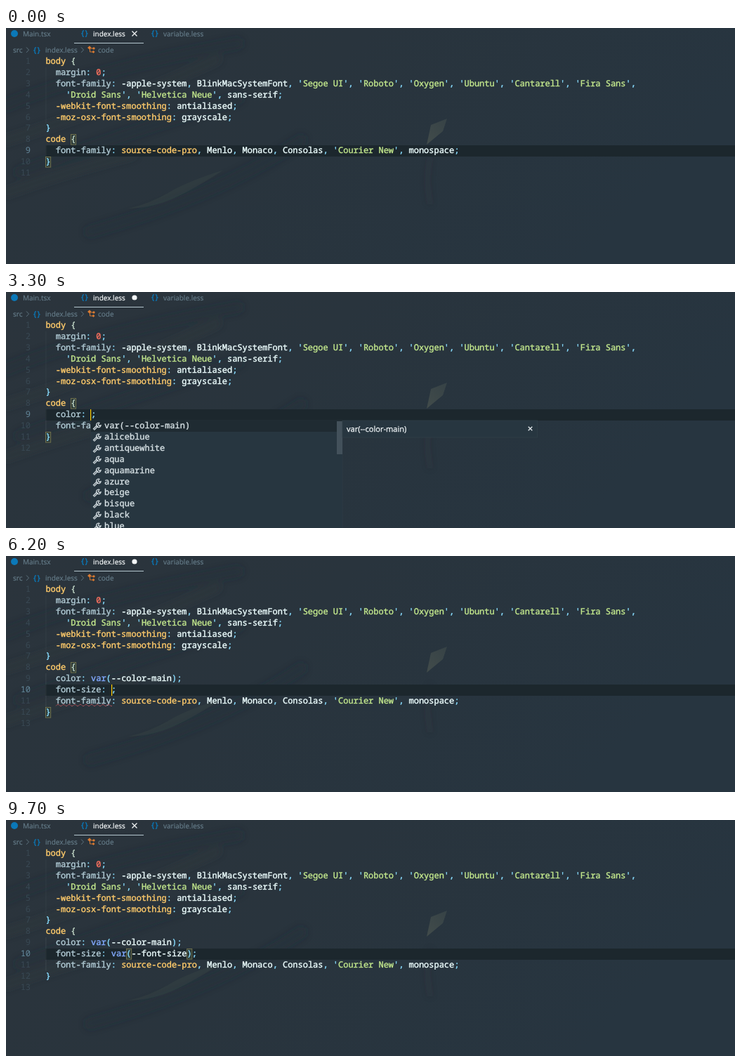
Write an HTML page that moves like this. It is 1038x336 px and loops after 9.9 s.

```html
<!DOCTYPE html>
<html lang="en">
<head>
<meta charset="utf-8">
<title>Editor completion</title>
<style>
  html, body { margin: 0; width: 100%; height: 100%; overflow: hidden; background: #28343e; }
  svg { display: block; width: 1038px; height: 336px; }
  text { white-space: pre; text-rendering: geometricPrecision; }
  .mono { font: 500 11.975px "Noto Sans Mono", "DejaVu Sans Mono", monospace; stroke-width: .4; }
  .ui { font: 10px "Open Sans", "Noto Sans", sans-serif; stroke-width: .2; }
  .doc { font: 11.05px "Open Sans", "Noto Sans", sans-serif; stroke-width: .3; }
  .hit { fill: #80cbc4; stroke: none; font-weight: 700; }
</style>
</head>
<body>
<svg viewBox="0 0 1038 336">
  <defs>
    <linearGradient id="sky" x2="1" y2="0.3">
      <stop offset="0" stop-color="#2b343c"/>
      <stop offset="0.45" stop-color="#29343d"/>
      <stop offset="1" stop-color="#273540"/>
    </linearGradient>
    <linearGradient id="kite" x1="1" y1="0" x2="0" y2="1">
      <stop offset="0" stop-color="#364246"/>
      <stop offset="1" stop-color="#424c4b"/>
    </linearGradient>
    <filter id="soft" x="-20%" y="-50%" width="140%" height="200%"><feGaussianBlur stdDeviation="5"/></filter>
  </defs>
  <rect width="1038" height="336" fill="url(#sky)"/>
  <g filter="url(#soft)" fill="none" stroke-linecap="round">
    <path d="M0 110Q120 60 330 22M20 205Q170 150 330 100M120 290Q300 240 420 160" stroke="#222d35" stroke-width="16" opacity=".3"/>
    <path d="M0 160Q160 110 300 45M0 235Q100 200 180 180" stroke="#343a3f" stroke-width="12" opacity=".35"/>
    <path d="M604 185Q597 215 604 250" stroke="#40343a" stroke-width="3" opacity=".3"/>
  </g>
  <path d="M174 257Q205 250 232 234T310 202Q270 228 240 242T174 257" fill="#364344" opacity=".55"/>
  <path d="M605 138L628 129L622 147L599 166Z" fill="url(#kite)"/>
  <g id="tabs"></g>
  <g id="editor"></g>
</svg>
<script>
const LOOP = 9900, X0 = 56.4, CW = 7.185, TOP = 40, LH = 15.9;
const C = { gold: '#ffcb6b', prop: '#b2ccd6', text: '#eeffff', str: '#c3e88d', punct: '#89ddff',
  open: '#c6dccb', close: '#89ddff', num: '#f7705f', fn: '#82aaff', dim: '#647b88', blue: '#0b78b8', panel: '#273640' };
const byId = id => document.getElementById(id);
const esc = s => s.replace(/&/g, '&amp;').replace(/</g, '&lt;');
const rowY = row => Math.round(TOP + (row - 1) * LH);
const colX = col => X0 + col * CW;

const text = (cls, x, y, body, fill, extra = '') =>
  `<text class="${cls}" x="${x}" y="${y}" fill="${fill}" stroke="${fill}" ${extra}>${body}</text>`;
const rect = (x, y, w, h, attrs) => `<rect x="${x}" y="${y}" width="${w}" height="${h}" ${attrs}/>`;
const line = (d, color, width) => `<path d="${d}" fill="none" stroke="${color}" stroke-width="${width}"/>`;
const cross = (x, y, r, color) =>
  line(`M${x - r} ${y - r}l${2 * r} ${2 * r}m0 ${-2 * r}l${-2 * r} ${2 * r}`, color, 1.3);
const chevron = x => line(`M${x} 27.5l3.5 3.7l-3.5 3.7`, '#5d727e', 1);
const braces = (x, y) => text('mono', x, y, '{}', C.blue, 'style="font-size:10.5px;letter-spacing:-.8px"');

const head = ['body {', '  margin: 0;',
  "  font-family: -apple-system, BlinkMacSystemFont, 'Segoe UI', 'Roboto', 'Oxygen', 'Ubuntu', 'Cantarell', 'Fira Sans',",
  "    'Droid Sans', 'Helvetica Neue', sans-serif;",
  '  -webkit-font-smoothing: antialiased;', '  -moz-osx-font-smoothing: grayscale;', '}', 'code {'];
const tail = ["  font-family: source-code-pro, Menlo, Monaco, Consolas, 'Courier New', monospace;", '}', ''];

const TOKEN = /('[^']*')|(^\w+(?= \{)|-(?:webkit|moz)[\w-]+|source-code-pro)|(\{)|(\})|([:;,()])|(\bvar\b(?=\())|(\b0\b)|(^ +\w[\w-]*)|([\w-]+)/g;
const KINDS = ['str', 'gold', 'open', 'close', 'punct', 'fn', 'num', 'prop', 'text'];
const span = (kind, s) => `<tspan fill="${C[kind]}" stroke="${C[kind]}">${esc(s)}</tspan>`;

// raw: freshly entered text that is not coloured yet.
function paint(src, raw) {
  return src.replace(TOKEN, (m, ...groups) => {
    let kind = KINDS[groups.findIndex(g => g !== undefined)];
    if (raw && (kind === 'fn' || /[()]/.test(m) || !src.includes(':'))) kind = 'text';
    if (kind === 'str') return span('punct', "'") + span('str', m.slice(1, -1)) + span('punct', "'");
    return span(kind, m);
  });
}

// Suggestion lists: items, highlighted part, side panel lines (# marks a title, @ a link).
const lists = {
  color: { hit: 'color|^col', items: ['color', 'color-adjust', 'color-interpolation-filters', 'column-rule-color', 'stop-color',
    'flood-color', 'border-color', 'caret-color', 'forced-color-adjust', 'outline-color'],
    docs: ["Sets the color of an element's text", 'Syntax: <color>', '@MDN Reference'] },
  colorValue: { items: ['var(--color-main)', 'aliceblue', 'antiquewhite', 'aqua', 'aquamarine', 'azure', 'beige',
    'bisque', 'black', 'blue'], docs: ['var(--color-main)'] },
  font: { hit: '^font?', thumb: 57, items: ['font: optional;', 'font-size', 'font-family', 'font-weight', 'font-style', 'font',
    'font-variant', 'font-display', 'font-feature-settings'], docs: ['#Emmet Abbreviation', 'font: optional;'] },
  fontS: { hit: '^font-s?', items: ['font-size', 'font-style', 'font-stretch', 'font-synthesis', 'font-size-adjust',
    'font-smooth', 'font-variant-caps', 'font-display', 'font-feature-settings'], docs: ['#Emmet Abbreviation', 'font-size: ;'] },
  sizeValue: { items: ['var(--font-size)', 'large', 'larger', 'medium', 'small', 'smaller', 'x-large', 'x-small',
    'xx-large', 'xx-small'], docs: ['var(--font-size)'] },
  variable: { hit: '^var', items: ['var(--font-size)', 'var(--font-family)', 'var(--color-main)', 'var()'], docs: ['var(--font-size)'] },
};

const wrench = (x, y) => `<g transform="translate(${x},${y}) scale(1.1)">` +
  line('M1.6 9.9L6.6 4.9', '#d3dce0', 3) + line('M2.1 9.4L6.4 5.1', C.panel, .9) +
  line('M9 1.2A3 3 0 1 0 11 4.2L8.8 5L7.5 3.6Z', '#d3dce0', 1.1) + '</g>';

function popup({ list, x, docs }, row) {
  const { items, hit, thumb = 47, docs: info } = lists[list], y = rowY(row + 1);
  const h = Math.min(items.length * LH, 337 - y);
  let out = rect(x, y, 358, h, `fill="${C.panel}" stroke="#303e47" stroke-width=".6"`) +
    rect(x, y, 358, 16, 'fill="#1f2b32"') +
    rect(x + 350, y + 1, 8, Math.min(thumb, h), 'fill="#43515b"');
  items.forEach((item, i) => {
    const cy = Math.round(y + i * LH);
    const body = hit ? item.replace(new RegExp(hit, 'g'), m => `<tspan class="hit">${m}</tspan>`) : item;
    out += wrench(x + 2, cy + 2) + text('mono', x + 19, cy + 11, body, '#d6e0e4');
  });
  if (!docs) return out;
  const dx = x + 358, titled = info[0][0] === '#';
  out += rect(dx, y, 277.5, titled ? 50 : 24 + (info.length - 1) * 26.5, `fill="${C.panel}" stroke="#313f48" stroke-width=".8"`) +
    cross(dx + 267.5, y + 11.5, 2.8, '#e0e6e9');
  info.forEach((s, i) => {
    const link = s[0] === '@', title = s[0] === '#';
    out += text(title ? 'mono' : 'doc', dx + 6, y + (title ? 15 : 16) + i * (titled ? 27.5 : 26.8),
      esc(s.replace(/^[@#]/, '')), link ? '#80cbc4' : title ? '#a9b9c1' : '#eef3f5');
  });
  return out;
}

function tabs(dirty) {
  return `<circle cx="12" cy="8" r="5" fill="${C.blue}"/>` +
    text('ui', 24, 11.6, 'Main.tsx', C.dim) +
    braces(106, 11.4) + text('ui', 124, 11.6, 'index.less', '#f8fbfc') +
    braces(206, 11.4) + text('ui', 224, 11.6, 'variable.less', C.dim) +
    rect(97, 21, 99, 1, 'fill="#b4c6ce"') +
    (dirty ? '<circle cx="183" cy="8" r="3.6" fill="#f4f7f8"/>' : cross(183, 8, 3.5, '#f4f7f8')) +
    text('ui', 10, 34.8, 'src', C.dim) + chevron(29) + braces(38, 34.5) +
    text('ui', 56, 34.8, 'index.less', C.dim) + chevron(107) +
    line('M118.5 29H125M119.5 30V34H124', '#d97b32', 1) +
    '<path d="M116 28l3-2.6l2.6 2.6l-3 2.6zM123 29l2-2l2 2l-2 2zM122.5 34l2-2l2 2l-2 2z" fill="#d97b32"/>' +
    text('ui', 131, 34.8, 'code', C.dim);
}

const box = (row, col) =>
  rect(colX(col) + .1, rowY(row) + .5, CW, 14.6, 'fill="#2d3b39" stroke="#77774f" stroke-width=".9"');

function editor(s) {
  const lines = [...head, ...s.mid, ...tail], last = lines.length, fontRow = last - 2;
  let out = rect(56, rowY(s.row), 982, 16, 'fill="#1c272d"') +
    rect(56.5, rowY(2), .8, 5 * LH, 'fill="#fff" opacity=".06"') +
    rect(56.5, rowY(9), .8, (last - 10) * LH, 'fill="#fff" opacity=".1"');
  if (s.match === 'scope') out += box(8, 5) + box(last - 1, 0);
  else {
    const src = lines[s.match - 1];
    out += box(s.match, src.indexOf('(')) + box(s.match, src.indexOf(')'));
  }
  lines.forEach((src, i) => {
    const y = rowY(i + 1) + 11;
    out += text('mono', 35, y, i + 1, i + 1 === s.row ? '#64889b' : '#394954', 'text-anchor="end" style="stroke:none"') +
      text('mono', X0, y, paint(src, s.raw && i + 1 === s.row), C.text);
  });
  if (s.error) {
    let d = `M71 ${rowY(fontRow) + 14.5}`;
    for (let i = 0; i < 20; i++) d += `l2 ${i % 2 ? 2 : -2}l2 0`;
    out += line(d, '#b0525c', .9);
  }
  if (s.on) out += rect(s.cx, rowY(s.row), 1.2, 16, 'fill="#ffcc00"');
  return out + (s.pop ? popup(s.pop, s.row) : '');
}

// Each step changes part of the state from its time on.
const steps = [], first = '  color: var(--color-main);';
const at = (time, change) => steps.push([time, change]);
const blink = (...times) => times.forEach((t, i) => at(t, { on: i % 2 === 1 }));
const show = (list, x, docs = true) => ({ pop: { list, x, docs } });
const type = (t, before, start, word, after = '', from = 1) => {
  for (let n = from; n <= word.length; n++, t += 100) {
    const s = start + word.slice(0, n);
    at(t, { mid: [...before, s + after], cx: Math.round(colX(s.length) - .3) });
  }
};

at(0, { mid: [], row: 9, cx: 643, on: false, match: 'scope', dirty: false, error: false, raw: false, pop: null });
at(1000, { row: 8, cx: 100, on: true });
blink(1300);
at(1500, { mid: ['  '], row: 9, cx: 70, on: true, dirty: true });
type(1600, [], '  ', 'color');
at(1800, { error: true });
at(2100, show('color', 107, false));
at(2200, show('color', 107));
at(2600, { mid: ['  color: ;'], cx: 120, pop: null });
at(2700, { error: false, ...show('colorValue', 121, false) });
at(2800, show('colorValue', 121));
blink(3000, 3300);
at(3500, { mid: [first], cx: 242, pop: null, raw: true });
at(3600, { match: 9, raw: false });
at(3900, { mid: [first, '  '], row: 10, cx: 70 });
at(4000, { match: 'scope' });
blink(4300, 4700);
at(4900, { raw: true });
type(4900, [first], '  ', 'font');
at(5100, { error: true, ...show('font', 92.3, false) });
at(5200, show('font', 92.3));
at(5300, show('font', 99.5));
type(5600, [first], '  ', 'font-s', '', 5);
at(5800, show('fontS', 113.8));
at(6100, { mid: [first, '  font-size: ;'], cx: 150, pop: null, raw: false });
at(6300, { error: false, ...show('sizeValue', 150, false) });
at(6400, show('sizeValue', 150));
blink(6600, 7000);
type(7200, [first], '  font-size: ', 'var', ';');
at(7400, show('variable', 172));
at(7800, { mid: [first, '  font-size: var(--font-size);'], cx: 265, pop: null, raw: true });
at(8000, { match: 10, raw: false });
blink(8300, 8700);
at(8800, { dirty: false });
blink(9000, 9400, 9700);
steps.sort((a, b) => a[0] - b[0]);

let shown = -1;
function draw(t) {
  const count = steps.filter(([time]) => time <= t).length;
  if (count === shown) return;
  shown = count;
  const state = Object.assign({}, ...steps.slice(0, count).map(step => step[1]));
  byId('tabs').innerHTML = tabs(state.dirty);
  byId('editor').innerHTML = editor(state);
}
function tick() {
  draw(performance.now() % LOOP);
  requestAnimationFrame(tick);
}
tick();
</script>
</body>
</html>
```
